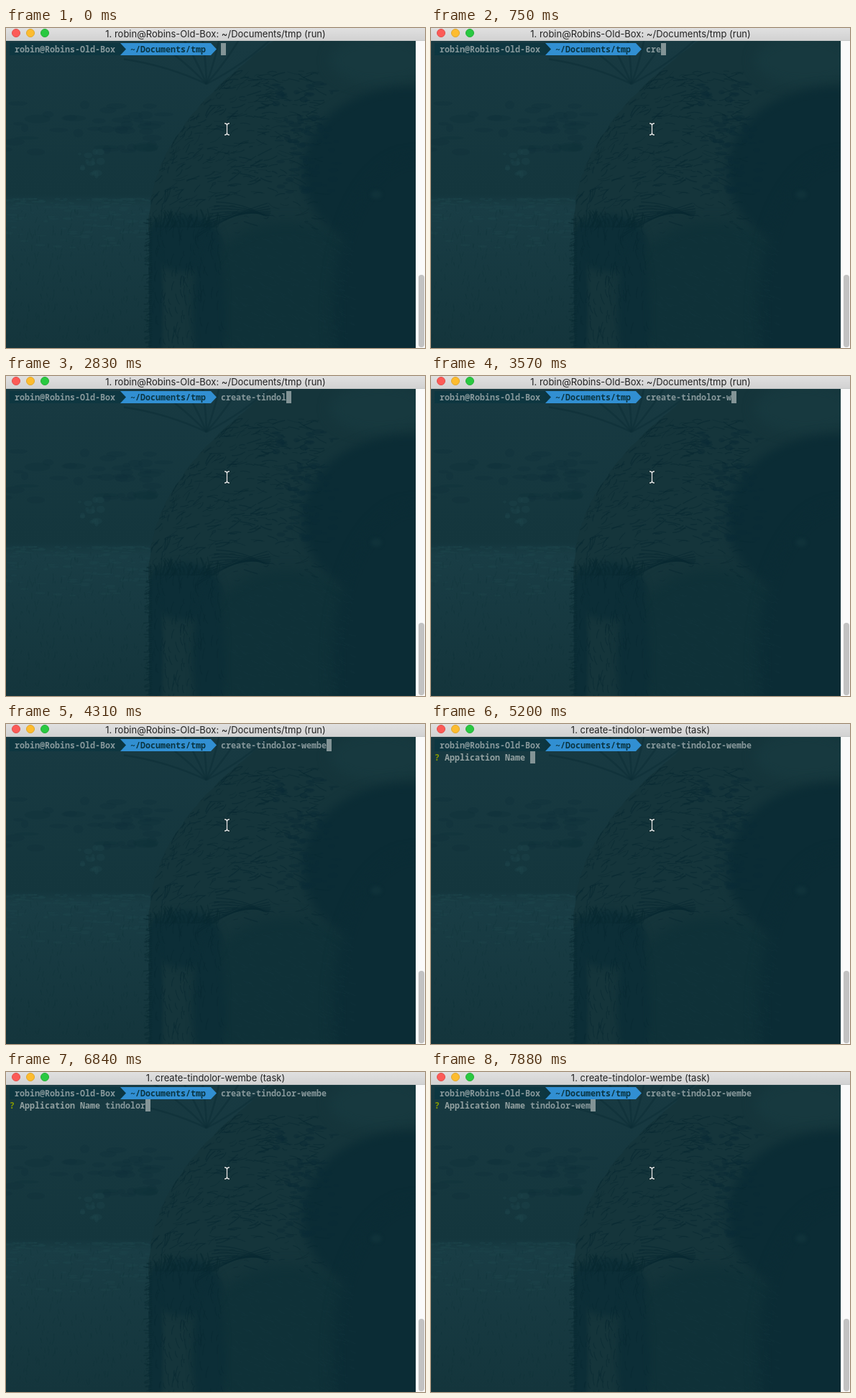
Recreate the animation shown at these times as an HTML page with a canvas. Size 583 by 446 pixels, loop 8000 ms.

```html
<!DOCTYPE html>
<html lang="en">
<head>
<meta charset="utf-8">
<title>Terminal</title>
<style>
  html, body { margin: 0; width: 100%; height: 100%; overflow: hidden; background: #15363e; }
  #stage { position: relative; width: 583px; height: 446px; overflow: hidden; }
  #stage > * { position: absolute; }
  canvas, svg { left: 0; top: 0; }
  #bar {
    left: 0; top: 0; width: 583px; height: 18px; box-sizing: border-box;
    background: linear-gradient(#e0e0e0, #d2d2d2); border-bottom: 1px solid #c6c8c8;
  }
  #title {
    left: 0; top: 0; width: 583px; text-align: center; white-space: pre;
    font: 13px/16px Inter, Roboto, sans-serif; color: #222;
  }
  .t {
    white-space: pre; color: #87989b;
    font: 600 11.667px/17px "Noto Sans Mono", "DejaVu Sans Mono", monospace;
  }
  .r1 { top: 21px; }
  .r2 { top: 38px; }
  .bold { font-weight: 700; color: #93a1a1; }
  #cursor { width: 7px; height: 17px; background: #839496; }
</style>
</head>
<body>
<div id="stage">
  <canvas id="photo" width="583" height="446"></canvas>
  <div id="bar"></div>
  <svg width="583" height="446" viewBox="0 0 583 446">
    <circle cx="14" cy="7" r="5.500" fill="#fc5b57" stroke="#e2504c"/>
    <circle cx="34" cy="7" r="5.500" fill="#fdbc2f" stroke="#e0a72c"/>
    <circle cx="54" cy="7" r="5.500" fill="#29c941" stroke="#27ae38"/>
    <path d="M570 18h13v428h-13z" fill="#fafafa"/>
    <path d="M570.5 18v428" stroke="#e4e6e6"/>
    <rect x="574" y="344" width="8" height="101" rx="4" fill="#c2c2c2"/>
    <path d="M5 21h154v17H5z" fill="#0b3640" opacity=".75"/>
    <path d="M158 21h127l8 8.500-8 8.500H158z" fill="#318fd2"/>
    <path d="M158 21h1l8 8.500-8 8.500h-1z" fill="#0c3641"/>
  </svg>
  <div class="t r1" style="left:12px">robin@Robins-Old-Box</div>
  <div class="t r1" style="left:173px;color:#0a3542">~/Documents/tmp</div>
  <div class="t r1" style="left:299px" id="cmd"></div>
  <div class="t r2 bold" style="left:5px" id="ask"><span style="color:#859900">?</span> Application Name</div>
  <div class="t r2" style="left:138px" id="name"></div>
  <div id="cursor"></div>
  <svg width="583" height="446" viewBox="0 0 583 446" fill="none" stroke-linecap="round">
    <defs><path id="beam" d="M304.500 133q3 0 3 3q0-3 3-3M307.500 136v10M304.500 149q3 0 3-3q0 3 3 3"/></defs>
    <use href="#beam" stroke="#0b1a1f" stroke-width="3" opacity=".6"/>
    <use href="#beam" stroke="#e6ecec" stroke-width="1.300"/>
  </svg>
  <div id="title"></div>
</div>
<script>
const $ = id => document.getElementById(id);

// ---- Backdrop: a dim elephant in a field ----
const ctx = $('photo').getContext('2d');
const DARK = '#0b2c35', SHADE = 'rgba(9,41,50,.55)', GLOW = 'rgba(30,70,79,.32)';
let seed = 7;
const rnd = (a = 0, b = 1) => {
  seed = (seed * 16807) % 2147483647;
  return a + (b - a) * seed / 2147483647;
};
const repeat = (n, f) => { for (let i = 0; i < n; i++) f(i / n); };

function oval(x, y, rx, ry, color, blur = 0) {
  ctx.filter = blur ? `blur(${blur}px)` : 'none';
  ctx.fillStyle = color;
  ctx.beginPath();
  ctx.ellipse(x, y, rx, ry, 0, 0, 7);
  ctx.fill();
  ctx.filter = 'none';
}

function hair(x, y, angle, len, color, width = 1, bend = 0) {
  const c = Math.cos(angle), s = Math.sin(angle);
  ctx.strokeStyle = color;
  ctx.lineWidth = width;
  ctx.beginPath();
  ctx.moveTo(x, y);
  ctx.quadraticCurveTo(x + c * len / 2 - s * bend, y + s * len / 2 + c * bend, x + c * len, y + s * len);
  ctx.stroke();
}

// Left outline of the head: a parabola down to the tusk, then straight
const rise = y => Math.max(0, (270 - y) / 250);
const edge = y => 199 + 170 * rise(y) ** 2;

function field() {
  const g = ctx.createLinearGradient(0, 18, 0, 446);
  g.addColorStop(0, '#183a42');
  g.addColorStop(.5, '#14363d');
  g.addColorStop(.54, '#193d45');
  g.addColorStop(1, '#14353c');
  ctx.fillStyle = g;
  ctx.fillRect(0, 0, 583, 446);
  repeat(45, () => oval(rnd(0, 220), rnd(105, 175), rnd(5, 18), rnd(2, 6), 'rgba(14,47,56,.28)'));
  repeat(14, () => oval(rnd(100, 132), rnd(172, 205), rnd(2, 8), rnd(2, 6), GLOW));
  repeat(170, () => oval(rnd(0, 200), 238 + 70 * rnd() ** 2, rnd(2, 8), rnd(.6, 2), GLOW));
  repeat(260, () => hair(rnd(0, 200), rnd(250, 440), rnd(-1.9, -1.2), rnd(3, 9), 'rgba(13,45,53,.22)'));
  repeat(7, k => hair(279, 78, -2.85 + 2.6 * k, 120, 'rgba(14,47,55,.6)', 2.5, 9));
}

function elephant() {
  ctx.save();
  ctx.beginPath();
  ctx.moveTo(583, 18);
  for (let y = 18; y <= 446; y += 4) ctx.lineTo(edge(y) + rnd(-1, 1), y);
  ctx.lineTo(583, 446);
  ctx.fillStyle = '#15353b';
  ctx.fill();
  ctx.clip();

  oval(520, 45, 70, 35, '#17393f', 8);
  oval(390, 375, 120, 105, '#0f3138', 9);
  oval(560, 200, 148, 118, DARK, 7);
  oval(570, 400, 115, 220, DARK, 9);
  oval(248, 300, 52, 40, '#0c2e37', 5);
  oval(207, 390, 11, 120, '#0c2e37', 2);
  oval(282, 400, 22, 110, '#0c2e37', 5);
  oval(515, 232, 8, 6, '#10323a', 2);

  // Wrinkles turn from the outline's slope to the level of the brow
  repeat(420, () => {
    const y = rnd(60, 285), inward = rnd() ** 1.4, x = edge(y) + inward * (430 - edge(y));
    const along = Math.atan2(-1, 1.36 * rise(y) + .1);
    hair(x, y, along * (1 - inward) ** 3 + rnd(-.5, .6), rnd(5, 22), SHADE, rnd(.6, 1.6), rnd(-4, 4));
  });
  repeat(10, k => hair(265 + 30 * k, 292 - 55 * k, -.45 + .8 * k, 110 - 45 * k, SHADE, 1.5, -9));
  repeat(90, () => oval(rnd(375, 460), rnd(75, 230), rnd(2, 9), rnd(1, 4), 'rgba(11,44,53,.45)'));

  // Cheek hatching and trunk folds
  repeat(420, () => hair(rnd(305, 480), rnd(285, 446), rnd(.2, .8), rnd(4, 11), 'rgba(24,60,67,.32)', .8, 1));
  repeat(130, () => hair(rnd(203, 300), rnd(270, 446), rnd(1.2, 1.9), rnd(6, 18), SHADE, 1.1, 2));
  ctx.restore();

  repeat(60, k => hair(203, 265 + 180 * k, rnd(2.6, 3.4), rnd(4, 12), SHADE, 1.2));
  repeat(45, k => hair(208 + 88 * k, 278, rnd(-2.1, -.9), rnd(8, 28), SHADE, 1.4, 2));
}

// ---- Typing: one digit per tick tells how many keys land in it ----
const LOOP = 8000, TICK = 148.5, CELL = 7;
const HOST = 'robin@Robins-Old-Box: ~/Documents/tmp', COMMAND = 'create-tindolor-wembe';
const command = { text: COMMAND, from: 0, beat: '001011120102001001111101111011' };
const answer = { text: 'tindolor-wem', from: 38, beat: '1110110120100111' };
const ENTER = 30, RENAME = 31, LAUNCH = 33, ASK = 35;

const typed = ({ text, from, beat }, tick) => {
  const keys = [...beat.slice(0, Math.max(0, tick - from + 1))];
  return text.slice(0, keys.reduce((sum, k) => sum + +k, 0));
};

function draw(t) {
  const tick = Math.floor(t / TICK), entered = tick >= ENTER, asked = tick >= ASK;
  const cmd = typed(command, tick), name = typed(answer, tick);
  $('title').textContent = `1. ${tick < RENAME ? HOST : COMMAND} (${tick < LAUNCH ? 'run' : 'task'})`;
  $('cmd').textContent = cmd;
  $('name').textContent = name;
  $('ask').style.visibility = asked ? 'visible' : 'hidden';
  const x = asked ? 138 + name.length * CELL : entered ? 5 : 299 + cmd.length * CELL;
  $('cursor').style.left = x + 'px';
  $('cursor').style.top = (entered ? 38 : 21) + 'px';
}

field();
elephant();
const start = performance.now();
function frame() {
  draw((performance.now() - start) % LOOP);
  requestAnimationFrame(frame);
}
frame();
</script>
</body>
</html>
```
